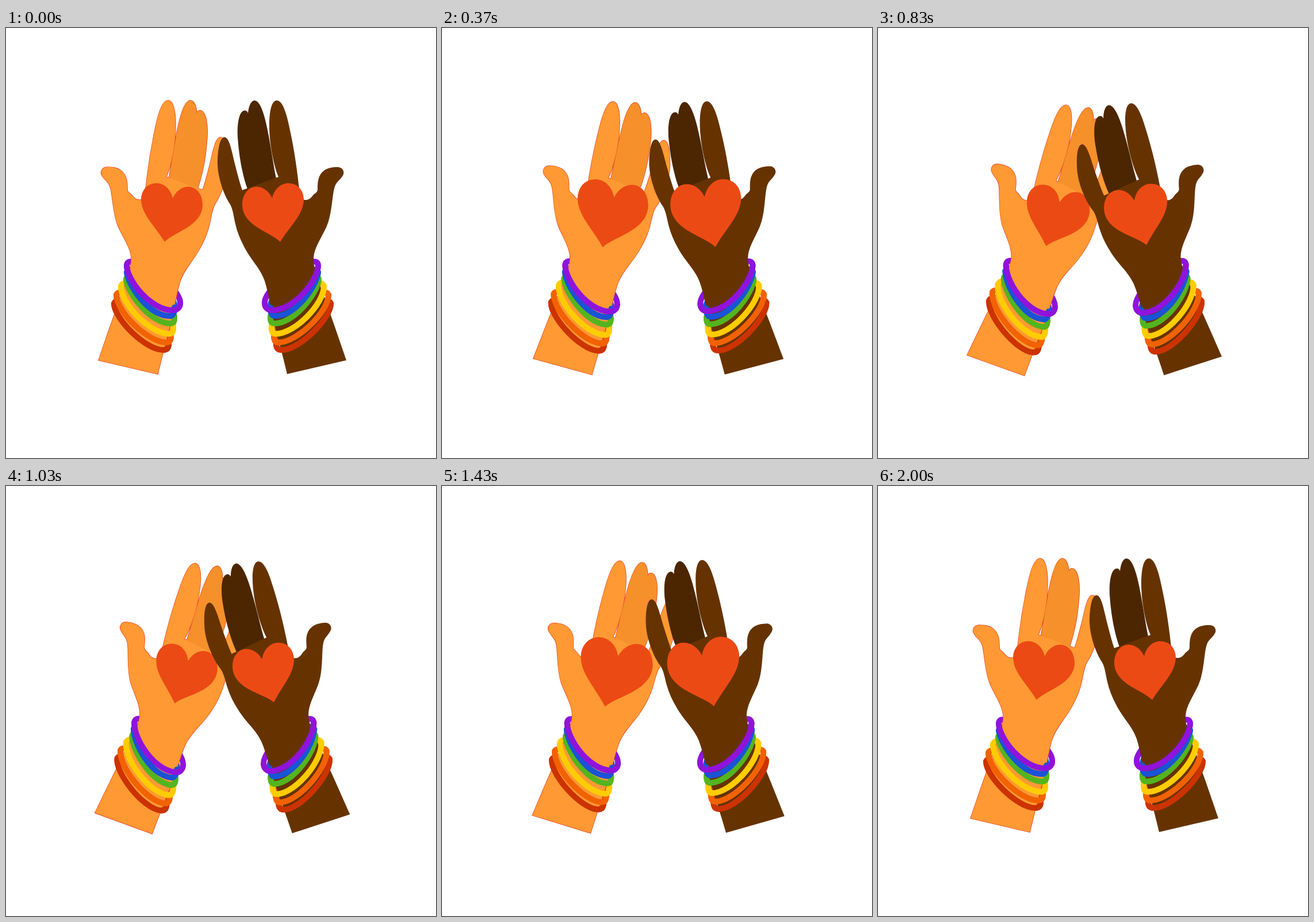
Recreate the animation shown at these times as an HTML page. Size 748 by 748 pixels, loop 2.03 s.

```html
<!DOCTYPE html>
<html lang="en">
<head>
<meta charset="utf-8">
<title>Two hands</title>
<style>
  html, body { margin: 0; width: 100%; height: 100%; overflow: hidden; background: #fff; }
  svg { display: block; width: 100%; height: 100%; }
</style>
</head>
<body>
<svg id="stage" viewBox="0 0 748 748"></svg>
<script>
const palm = `M161 578 L264 602
  C272 568 281 535 288 508 C293 488 296 462 303 440
  C311 417 327 404 339 380 C346 367 351 354 354 341
  C357 328 358 316 363 307 C374 291 386 258 385 230
  C384 206 380 190 373 190 C364 190 360 216 354 240
  C350 255 347 268 342 282 L279 259
  C286 243 295 205 295 170 C295 145 291 126 282 126
  C272 126 265 148 260 173 C253 205 248 235 244 272
  C242 285 240 297 234 299 C226 300 222 295 219 291
  C214 286 211 286 211 280 C211 265 209 256 201 249
  C193 242 182 242 175 242 C166 243 163 252 168 258
  C173 266 179 267 182 279 C186 295 186 325 196 347
  C206 368 217 383 218 400 C219 425 200 460 188 500
  C178 528 170 552 161 578 Z`;

const fingers = `M283 262 C287 243 291 215 296 188
  C301 160 309 126 321 126 C328 127 331 138 332 148
  C334 143 337 143 340 144 C349 148 351 172 350 190
  C348 220 343 252 333 280 Z`;

const heart = `M290 296 C286 279 274 270 262 270
  C245 270 235 283 235 299 C236 325 258 343 276 372
  C292 355 341 345 342 308 C342 290 332 276 317 276
  C305 276 295 285 290 296 Z`;

// colour, strand over the wrist, return behind the wrist
const bangles = [
  ['#cc3300', 'M188 479 C188 506 243 560 273 560 C281 560 283 555 283 549', 'C285 520 195 458 188 479'],
  ['#f26202', 'M192 464 C192 494 247 547 279 547 C287 547 287 540 287 532', 'C290 505 198 445 192 464'],
  ['#ffcc00', 'M200 449 C200 480 250 532 284 532 C291 532 291 525 291 518', 'C292 490 208 425 200 449'],
  ['#54b41f', 'M209 437 C211 462 252 514 286 514 C293 514 293 508 293 502', 'C290 470 212 415 209 437'],
  ['#1a53d6', 'M210 425 C214 452 250 501 285 501 C292 501 293 494 293 486', 'C296 455 214 405 210 425'],
  ['#9013dc', 'M210 413 C211 440 252 491 290 491 C300 491 303 484 303 478', 'C304 450 212 385 210 413']
];

const strands = whole => bangles.map(([color, front, back]) =>
  `<path d="${front}${whole ? back : ''}" stroke="${color}"/>`).join('');

const band = whole =>
  `<g fill="none" stroke-width="10" stroke-linecap="round" stroke-linejoin="round">${strands(whole)}</g>`;

function hand(id, skin, shade, edge) {
  const outline = edge
    ? `<path d="${fingers}${palm}" fill="none" stroke="${edge}" stroke-width="1.6"/>` : '';
  return `<g id="${id}">${band(true)}${outline}
    <path d="${fingers}" fill="${shade}"/>
    <path d="${palm}" fill="${skin}"/>
    ${band(false)}
    <path class="heart" d="${heart}" fill="#ec4a14"/></g>`;
}

const stage = document.getElementById('stage');
stage.innerHTML =
  hand('left', '#ff9933', '#f5902b', '#e5452a') +
  hand('right', '#663300', '#4c2600');

const left = document.getElementById('left');
const right = document.getElementById('right');
const hearts = stage.querySelectorAll('.heart');

const LOOP = 2030, STEP = 100 / 3, LAST = 60;
const tilt = [[0, 0], [29, 1], [60, 0]];
const pulse = [[0, 1], [15, 1.185], [29, 1], [45, 1.185], [60, 1]];

// smooth ease between neighbouring keys
function at(keys, x) {
  const i = Math.max(1, keys.findIndex(k => k[0] >= x));
  const [x0, y0] = keys[i - 1], [x1, y1] = keys[i];
  const u = (x - x0) / (x1 - x0);
  return y0 + (y1 - y0) * u * u * (3 - 2 * u);
}

function draw(ms) {
  const step = Math.min(LAST, Math.floor((ms % LOOP + 5) / STEP));
  const turn = at(tilt, step), size = at(pulse, step);
  left.setAttribute('transform', `rotate(${7 * turn} 235.5 522.5)`);
  right.setAttribute('transform', `rotate(${-5 * turn} 517 502) translate(753 0) scale(-1 1)`);
  for (const h of hearts)
    h.setAttribute('transform', `translate(288 321) scale(${size}) translate(-288 -321)`);
}

const start = performance.now();
function tick() {
  draw(performance.now() - start);
  requestAnimationFrame(tick);
}
tick();
</script>
</body>
</html>
```
